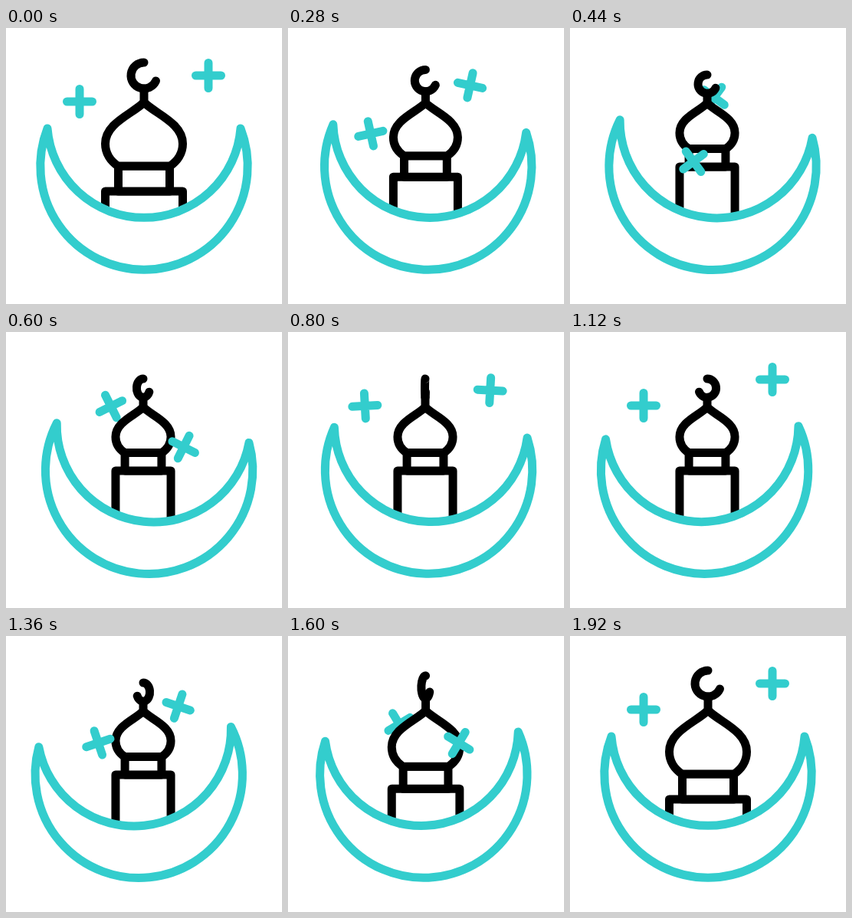
These frames come from a looping animation (360x360 px, 2000 ms). An HTML page:

```html
<!DOCTYPE html>
<html lang="en">
<head>
<meta charset="utf-8">
<title>Crescent and dome</title>
<style>
  html, body { margin: 0; width: 100%; height: 100%; overflow: hidden; background: #fff; }
  svg { display: block; width: 360px; height: 360px; }
  path { stroke-width: 11; stroke-linecap: round; stroke-linejoin: round; fill: #fff; vector-effect: non-scaling-stroke; }
  .teal { stroke: #33cdcd; }
  .black { stroke: #000; }
  .open { fill: none; }
</style>
</head>
<body>
<svg viewBox="0 0 360 360">
  <path id="back" class="teal open" d="M-16.5 0H16.5M0 -16.5V16.5"/>
  <g id="tower" class="black">
    <path d="M129.5 300V213H230.5V300"/>
    <path d="M146.5 180H213.5V213H146.5Z"/>
    <path d="M180 97C165 112 129.5 124 129.5 151C129.5 164 137 174 146 180H214C223 174 230.5 164 230.5 151C230.5 124 195 112 180 97Z"/>
    <path class="open" d="M180 79V97"/>
    <path id="finial" class="open" d="M0 -17A17 17 0 1 0 15.5 7"/>
  </g>
  <path id="front" class="teal open" d="M-16.5 0H16.5M0 -16.5V16.5"/>
  <path id="moon" class="teal" d="M54 131A135.2 135.2 0 1 0 306 131A126.4 126.4 0 0 1 54 131Z"/>
</svg>
<script>
const LOOP = 2000, STEP = 40;
const LEFT = [96, 96], RIGHT = [264, 62];

// Keyframes as [time, value], eased in and out between neighbours
const tilt = [[80, 0], [540, 6], [1340, -6], [1840, 0]];
const size = [[80, 1], [440, 0.714], [1360, 0.714], [1800, 1]];
const turn = [[400, 1], [1200, -1], [1840, 1]];

// The two stars trade places twice, one passing behind the dome
const swaps = [
  { from: 80, to: 900,
    front: [LEFT, [105, 215], [267, 196], RIGHT],
    back: [RIGHT, [201, 97], [135, 100], LEFT] },
  { from: 1120, to: 1920,
    front: [LEFT, [110, 190], [268, 166], RIGHT],
    back: [RIGHT, [200, 120], [136, 129], LEFT] }
];

const el = id => document.getElementById(id);
const set = (id, value) => el(id).setAttribute("transform", value);
const ease = p => (1 - Math.cos(Math.PI * Math.min(1, Math.max(0, p)))) / 2;

function track(keys, t) {
  let value = keys[0][1];
  for (let i = 1; i < keys.length; i++) {
    const [t0, v0] = keys[i - 1], [t1, v1] = keys[i];
    if (t >= t0) value = v0 + (v1 - v0) * ease((t - t0) / (t1 - t0));
  }
  return value;
}

function curve(points, u) {
  const v = 1 - u;
  const w = [v * v * v, 3 * v * v * u, 3 * v * u * u, u * u * u];
  return [0, 1].map(axis => points.reduce((sum, p, i) => sum + p[axis] * w[i], 0));
}

function draw(t) {
  set("moon", `rotate(${track(tilt, t)} 180 245)`);
  set("tower", `translate(176.5 101) scale(${track(size, t)}) translate(-176.5 -101)`);

  // A zero scale would hide the finial when it is edge-on
  const flip = track(turn, t);
  set("finial", `translate(180 62) scale(${Math.abs(flip) < 0.04 ? 0.04 : flip} 1)`);

  const swap = swaps[t < 1000 ? 0 : 1];
  const u = ease((t - swap.from) / (swap.to - swap.from));
  set("front", `translate(${curve(swap.front, u)}) rotate(${-90 * u})`);
  set("back", `translate(${curve(swap.back, u)}) rotate(${90 * u})`);
}

const start = performance.now();
function frame() {
  const t = (performance.now() - start) % LOOP;
  draw(Math.floor(t / STEP) * STEP);
  requestAnimationFrame(frame);
}
frame();
</script>
</body>
</html>
```
